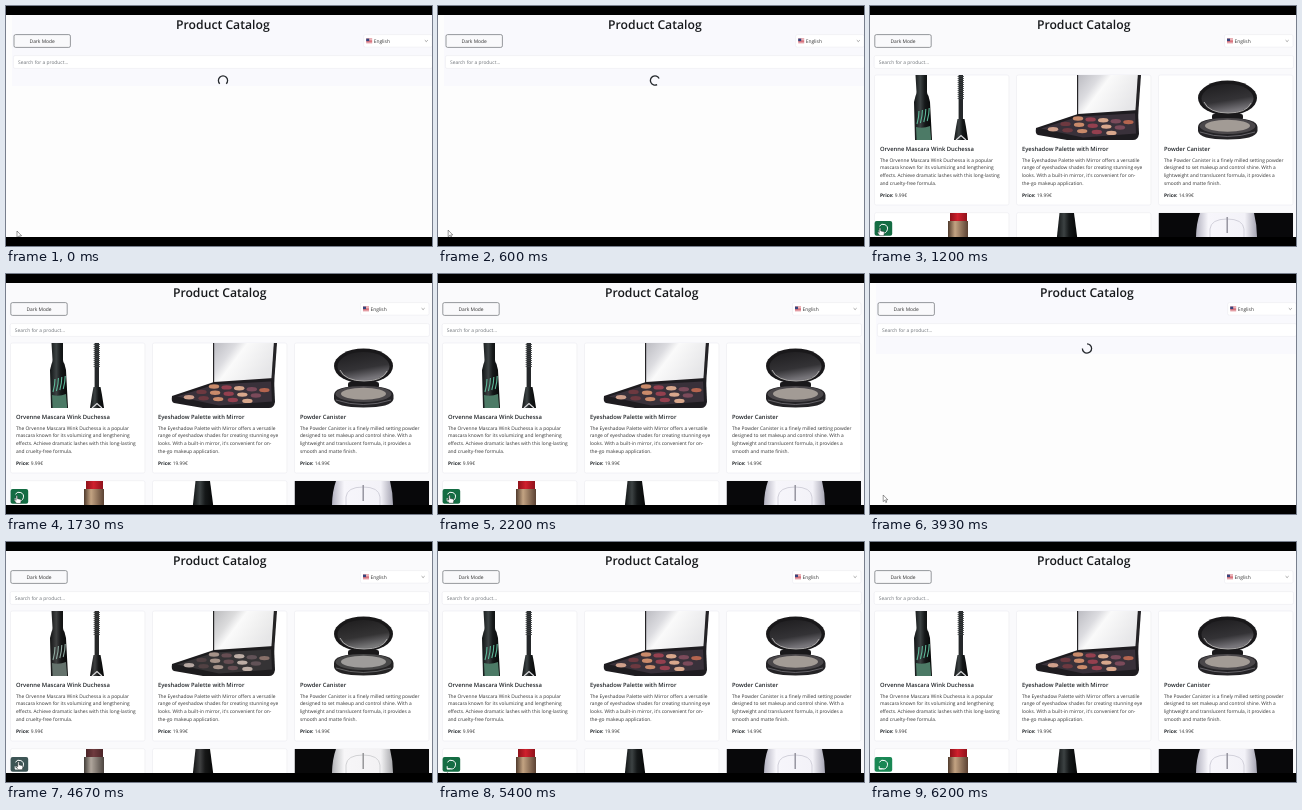
An HTML page for the animation above (6.27 s loop, 426 by 240 pixels).

```html
<!DOCTYPE html>
<html lang="en">
<head>
<meta charset="utf-8">
<title>Product Catalog</title>
<style>
html, body { margin: 0; width: 100%; height: 100%; overflow: hidden; background: #000; }
svg { display: block; width: 100vw; height: 100vh; }
text { font: 4.9px "Open Sans", "Noto Sans", sans-serif; fill: #333; text-rendering: geometricPrecision; }
.title { font-size: 12.2px; font-weight: 600; fill: #17191c; text-anchor: middle; }
.name { font-size: 5.85px; font-weight: 600; fill: #212529; }
.body { font-size: 4.87px; }
.bold { font-weight: 700; fill: #212529; }
.hint { fill: #70757a; }
.box { fill: #fff; stroke: #e6e6ec; stroke-width: .5; }
</style>
</head>
<body>
<svg viewBox="0 0 426 240" preserveAspectRatio="none">
  <defs>
    <clipPath id="view"><rect y="9" width="426" height="222"/></clipPath>
    <linearGradient id="tube"><stop stop-color="#101314"/><stop offset=".35" stop-color="#3c4243"/><stop offset=".6" stop-color="#151819"/><stop offset="1" stop-color="#060707"/></linearGradient>
    <linearGradient id="mirror" x2="1" y2=".5"><stop stop-color="#bcbcc2"/><stop offset=".3" stop-color="#dcdce0"/><stop offset=".45" stop-color="#fafafa"/><stop offset="1" stop-color="#e6e6e8"/></linearGradient>
    <linearGradient id="glass" x2=".3" y2="1"><stop stop-color="#1d1c1e"/><stop offset=".65" stop-color="#343336"/><stop offset="1" stop-color="#77757a"/></linearGradient>
    <linearGradient id="gold"><stop stop-color="#4f3a2c"/><stop offset=".35" stop-color="#c3a382"/><stop offset="1" stop-color="#5b4233"/></linearGradient>
    <linearGradient id="red"><stop stop-color="#8d1119"/><stop offset=".45" stop-color="#d0202d"/><stop offset="1" stop-color="#8f121b"/></linearGradient>
    <linearGradient id="bottle"><stop stop-color="#b3b2c0"/><stop offset=".2" stop-color="#f7f6fb"/><stop offset=".8" stop-color="#f3f2f8"/><stop offset="1" stop-color="#a5a4b2"/></linearGradient>
  </defs>
  <rect width="426" height="240"/>
  <g clip-path="url(#view)">
    <rect id="page" y="9" width="426" height="223"/>
    <rect id="band" x="6" y="9" width="420" height="71" fill="#f9f9fd"/>
    <g id="head">
      <text class="title" x="213.7" y="23.2">Product Catalog</text>
      <rect x="4.8" y="28.6" width="56.4" height="12.8" rx="1.6" fill="#f9f9fb" stroke="#6c7074" stroke-width=".7"/>
      <text x="33" y="37" text-anchor="middle">Dark Mode</text>
      <rect class="box" x="354.5" y="28.6" width="68.5" height="12.6" rx="1.6"/>
      <g id="flag"></g>
      <text x="364.5" y="36.6">English</text>
      <path d="M415.6 34.2l1.5 1.4 1.5-1.4" fill="none" stroke="#666" stroke-width=".6"/>
      <rect class="box" x="4.2" y="49.6" width="419.2" height="12.8" rx="1.6"/>
      <text class="hint" x="8.8" y="57.6">Search for a product...</text>
    </g>
    <path id="spin" d="M3.25-3.25A4.6 4.6 0 1 0 3.25 3.25" fill="none" stroke="#25292d" stroke-width="1.3"/>
    <g id="list"></g>
    <g id="button">
      <rect id="face" x="4.6" y="215" width="17.6" height="14.8" rx="2"/>
      <path d="M9.4 220.2A4.4 4.4 0 1 1 12.6 227M9 226.8h4.2M9.2 224.2v2.7h2.7" fill="none" stroke="#fff" stroke-width="1"/>
    </g>
    <g id="cursor" stroke="#222" stroke-width=".45" stroke-linejoin="round" fill="#fff">
      <path id="arrow" d="M0 0v6.6l1.5-1.4 1.1 2.4 1-.5-1.1-2.3h2.1z"/>
      <path id="hand" d="M-.7.3q.7-1 1.4 0v2.6l2.8.7q.9.3.8 1.3l-.5 2.8h-4l-2.2-3q-.2-1 .8-.7l.9.7z"/>
    </g>
  </g>
</svg>
<script>
const $ = id => document.getElementById(id);
const rect = (x, y, w, h, fill, rx = 0) =>
  `<rect x="${x}" y="${y}" width="${w}" height="${h}" rx="${rx}" fill="${fill}"/>`;
const oval = (x, y, rx, ry, fill) =>
  `<ellipse cx="${x}" cy="${y}" rx="${rx}" ry="${ry}" fill="${fill}"/>`;
const path = (d, fill) => `<path d="${d}" fill="${fill}"/>`;
const line = (d, stroke, w) => `<path d="${d}" fill="none" stroke="${stroke}" stroke-width="${w}"/>`;

function flag(x, y) {
  let s = rect(x, y, 6, 4.6, '#fff');
  for (let i = 0; i < 4; i++) s += rect(x, y + i * 1.3, 6, .7, '#c83a48');
  return s + rect(x, y, 3, 2.5, '#36447c');
}

function mascara() {
  let s = path('M45.5 69h11.5v17q0 2 1.5 4l1.5 6 2 38h-17l-1-38 1.5-6q1-2 1-4z', 'url(#tube)');
  for (let i = 0; i < 4; i++) {
    s += line(`M${47 + i * 3.4} ${118 - i}q2-7 2-13`, '#5fb899', 1.1);
  }
  s += path('M46 121q7 2 14-1l1.2 14h-14.5z', '#4c7a66');
  s += rect(88.6, 69, 4.4, 48, '#25282a');
  for (let y = 70; y < 94; y += 2) s += rect(87.6, y, 6.4, .8, '#3a3e40');
  return s + path('M87.5 113h7l1.5 8 2 13h-14l2-13z', 'url(#tube)') +
    line('M86 134l5-4.5 5 4.5', '#d9d9dc', 1.2);
}

function palette() {
  const shades = ['#c98a6a', '#8d4a4f', '#d8a78c', '#6d3940', '#b5654f', '#94404f', '#cfa08c', '#7b4a5a'];
  let s = path('M207 69h64l-3 42-61-2z', '#242326') + path('M208.2 69h59.6l-2.4 36-57.2 4z', 'url(#mirror)');
  s += path('M166 122l42-14 60-4 1 24q-1 6-6 6h-66l-29-5q-3-1-2-7z', '#1e1c20');
  s += path('M171 122.5l38-12 56-3 1 20-53 4z', '#39313a');
  for (let r = 0; r < 3; r++) for (let c = 0; c < 5; c++) {
    s += oval(208 - r * 12.5 + c * (12.6 + r), 112.5 + r * 5.4 + c * .9, 5.2, 2.2, shades[(r * 3 + c * 5) % 8]);
  }
  return s;
}

const compact = () =>
  oval(357.5, 92, 29.5, 17.5, '#19181a') + oval(357.5, 92.5, 26, 14.6, 'url(#glass)') +
  line('M334 96q5 11 24 11t23-10', '#a9a7a6', 1) +
  rect(342, 108, 31, 6, '#19181a', 2) +
  path('M328 121q0-9 29.5-9t30 9v4q-2 8.5-30 8.5t-29.5-8.5z', '#242326') +
  oval(357.5, 120, 28, 8, '#4a474a') + oval(357.5, 119.8, 22.5, 6, '#a29b95') +
  line('M330 126q27 9 55 0', '#77747a', .8);

const lipstick = () =>
  path('M80 207h17v9h-17z', 'url(#red)') + rect(78, 215, 20, 18, 'url(#gold)');
const polish = () => path('M189.5 207h14.5l3.3 25h-20.5z', 'url(#tube)');
const bottle = () =>
  rect(288.8, 207, 134.2, 26, '#08080a') + path('M330 207h54q3 12 3 25h-61q0-14 4-25z', 'url(#bottle)') +
  line('M340 232v-9q1-10 17-10t17 10v9', '#d2d1db', 1) + rect(356.5, 211, 1.4, 16, '#8f8e9a');

const items = [
  ['Orvenne Mascara Wink Duchessa', '9.99€', mascara,
    ['The Orvenne Mascara Wink Duchessa is a popular', 'mascara known for its volumizing and lengthening',
      'effects. Achieve dramatic lashes with this long-lasting', 'and cruelty-free formula.']],
  ['Eyeshadow Palette with Mirror', '19.99€', palette,
    ['The Eyeshadow Palette with Mirror offers a versatile', 'range of eyeshadow shades for creating stunning eye',
      "looks. With a built-in mirror, it's convenient for on-", 'the-go makeup application.']],
  ['Powder Canister', '14.99€', compact,
    ['The Powder Canister is a finely milled setting powder', 'designed to set makeup and control shine. With a',
      'lightweight and translucent formula, it provides a', 'smooth and matte finish.']]
];
const nextRow = [lipstick, polish, bottle];

function card([name, price, art, lines], i) {
  const x = 4.5 + i * 142, tx = x + 5.4;
  const box = (y, h) => `<rect class="box" x="${x}" y="${y}" width="134.4" height="${h}" rx="1.8"/>`;
  return box(69, 130) + box(206.7, 130) + `<g class="art">${art()}${nextRow[i]()}</g>` +
    `<text class="name" x="${tx}" y="145.2">${name}</text>` +
    lines.map((text, n) => `<text class="body" x="${tx}" y="${155.6 + n * 7.75}">${text}</text>`).join('') +
    `<text class="body" x="${tx}" y="191.4"><tspan class="bold">Price:</tspan> ${price}</text>`;
}

$('flag').innerHTML = flag(357, 32.6);
$('list').innerHTML = items.map(card).join('');
const art = document.querySelectorAll('.art');

const LOOP = 6270;
// Each load: start, end
const loads = [[-187, 930], [3461, 4578]];
// Pointer: time, x, y
const track = [[0, 11, 225], [700, 10, 224], [1200, 10, 222], [2200, 11.5, 221.5], [2930, 12.5, 220.5],
  [3930, 13.2, 221], [4670, 12.5, 220], [5000, 12.5, 220], [5600, 8, 236], [LOOP, 8, 236]];

function pointer(t) {
  const i = track.findIndex(p => p[0] > t);
  const [a, b] = [track[i - 1], track[i]];
  const k = (t - a[0]) / (b[0] - a[0]);
  return [a[1] + (b[1] - a[1]) * k, a[2] + (b[2] - a[2]) * k];
}
const show = (el, on) => el.setAttribute('visibility', on ? 'visible' : 'hidden');

function draw(now) {
  const t = now % LOOP;
  const load = loads.find(([a, b]) => t >= a && t < b);
  const [x, y] = pointer(t);
  const over = !load && y < 231;
  const grey = t >= 4578 && t < 4700;
  show($('band'), load);
  show($('spin'), load);
  show($('list'), !load);
  show($('button'), !load);
  show($('arrow'), load);
  show($('hand'), over);
  $('page').setAttribute('fill', load ? '#fdfdfd' : '#fafafc');
  $('head').setAttribute('transform', `translate(${load ? 3.2 : 0} 0)`);
  if (load) $('spin').setAttribute('transform', `translate(217 74.5) rotate(${(t - load[0]) * .48})`);
  $('cursor').setAttribute('transform', `translate(${x} ${y})`);
  $('face').setAttribute('fill', grey ? '#3d5555' : over ? '#146c43' : '#198754');
  art.forEach(g => { g.style.filter = grey ? 'saturate(.3)' : 'none'; });
}

const start = performance.now();
function tick() {
  draw(performance.now() - start);
  requestAnimationFrame(tick);
}
tick();
</script>
</body>
</html>
```
